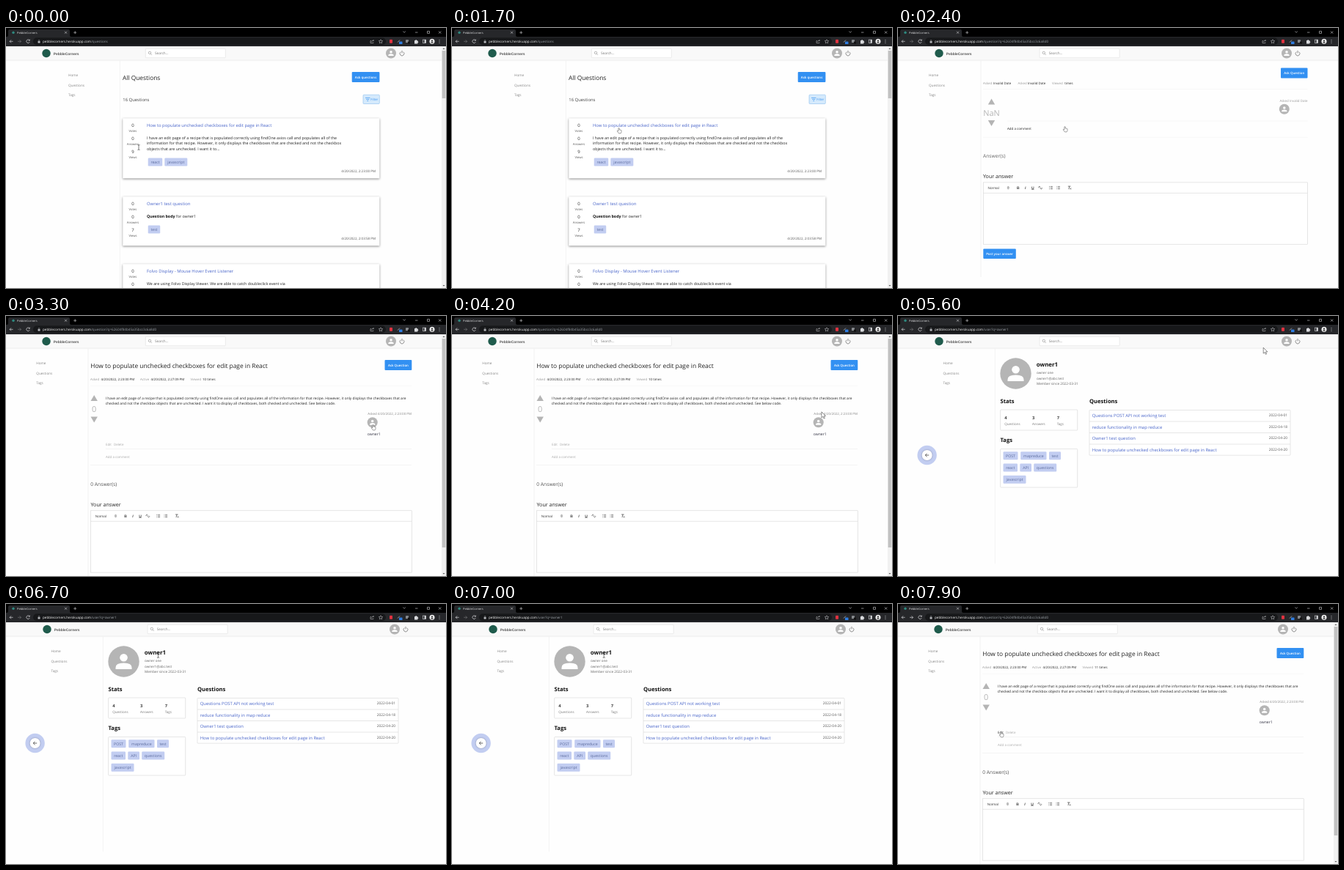
Recreate the animation shown at these times as an HTML page. Size 600x355 px, loop 8000 ms.

```html
<!DOCTYPE html>
<html lang="en">
<head>
<meta charset="utf-8">
<title>PebbleCorners</title>
<style>
html, body { margin: 0; width: 100%; height: 100%; overflow: hidden; background: #fff; }
svg { display: block; width: 600px; height: 355px; }
text { font-family: "Open Sans", "Noto Sans", sans-serif; white-space: pre; text-rendering: geometricPrecision; }
.card { filter: drop-shadow(0 1.5px 1.7px rgba(0, 0, 0, .45)); }
.soft { filter: drop-shadow(0 .4px .8px rgba(0, 0, 0, .3)); }
</style>
</head>
<body>
<svg id="stage" viewBox="0 0 600 355" xmlns="http://www.w3.org/2000/svg"></svg>
<script>
const LOOP = 8000, STEP = 100;
const BLUE = '#3290f2', LINK = '#4a66c9', INK = '#222', GREY = '#858585', PALE = '#b4b4b4', TAG = '#c2cdf1';
const SITE = 'pebblecorners.herokuapp.com';
const HEADLINE = 'How to populate unchecked checkboxes for edit page in React';

// drawing helpers; text y is the visual middle of the line
const text = (x, y, size, str, fill = INK, extra = '') =>
  `<text x="${x}" y="${y + size * .36}" font-size="${size}" fill="${fill}" ${extra}>${str}</text>`;
const END = 'text-anchor="end"', MID = 'text-anchor="middle"', BOLD = 'font-weight="700"', SEMI = 'font-weight="600"';
const SANS = `style="font-family:'Liberation Sans',sans-serif"`;
const rect = (x, y, w, h, fill, extra = '') =>
  `<rect x="${x}" y="${y}" width="${w}" height="${h}" fill="${fill}" ${extra}/>`;
const frame = (x, y, w, h, stroke, r = .8) =>
  rect(x, y, w, h, '#fff', `rx="${r}" stroke="${stroke}" stroke-width=".5"`);
const disc = (x, y, r, fill, extra = '') => `<circle cx="${x}" cy="${y}" r="${r}" fill="${fill}" ${extra}/>`;
const line = (d, stroke, w = .5, extra = '') => `<path d="${d}" fill="none" stroke="${stroke}" stroke-width="${w}" ${extra}/>`;
const hline = (x1, x2, y, c = '#e9e9e9') => line(`M${x1} ${y}H${x2}`, c);
const group = (id, body) => `<g id="${id}">${body}</g>`;

const button = (x, y, w, h, label) =>
  rect(x, y, w, h, BLUE, 'rx="1"') + text(x + w / 2, y + h / 2, 4.4, label, '#fff', `${MID} ${SEMI}`);
const tag = (x, y, w, label) =>
  rect(x, y, w, 11, TAG, 'rx="1.2"') + text(x + w / 2, y + 5.4, 5.2, label, '#5b6b9d', MID);
const person = (x, y, r) => disc(x, y, r, '#b5b5b5') + disc(x, y - r * .25, r * .25, '#fff') +
  `<path d="M${x - r * .52} ${y + r * .5}v${-r * .1}q0 ${-r * .3} ${r * .52} ${-r * .3}t${r * .52} ${r * .3}v${r * .1}z" fill="#fff"/>`;

function chrome() {
  const c = '#d8d9dc';
  return rect(0, 0, 600, 25, '#000') +
    '<path d="M1 12Q3 12 3 10V4Q3 2 5 2H85Q87 2 87 4V10Q87 12 89 12H600V25H0V12z" fill="#26272a"/>' +
    disc(10, 6.2, 1.7, '#2e8a80') + text(15, 6.2, 4, 'PebbleCorners', '#dfe0e2') +
    line('M80 4.7l3 3m0-3l-3 3M92.2 6.2h4m-2-2v4', c, .6) +
    line('M541.5 4.5l1.7 1.7l1.7-1.7M558 6h3.5M574.5 4.3h3v3h-3zM590 4.4l3.2 3.2m0-3.2l-3.2 3.2', c, .6) +
    rect(37, 13.3, 481, 10, '#17181a', 'rx="5"') +
    line('M9.5 18.3H5m2-2l-2 2l2 2', c, .7) +
    group('fwd', line('M16 18.3h4.5m-2-2l2 2l-2 2', c, .7)) +
    line('M32 16.8a2.3 2.3 0 1 0 .3 2.2m0-3.5v1.7h-1.7', c, .7) +
    rect(43.5, 17.9, 3, 2.5, '#b9bbbf', 'rx=".3"') + line('M44.2 18v-.8a.8 .8 0 0 1 1.6 0v.8', '#b9bbbf') +
    text(50, 18.3, 4.6, `${SITE}<tspan id="path" fill="#9aa0a6"></tspan>`, '#f4f4f4') +
    line('M498 17.5h-1v3h4v-1M498.5 19q0-2 3-2m-1-1l1 1l-1 1', c) +
    line('M511 15.7l.8 1.7l1.9.2l-1.4 1.3l.4 1.9l-1.7-1l-1.7 1l.4-1.9l-1.4-1.3l1.9-.2z', c) +
    rect(523, 15.7, 4, 5, '#e0323f', 'rx=".8"') +
    line('M534 19.5l3-3', '#9aa0a6', 1) + rect(536, 18.5, 4.5, 3.5, '#2f7de0', 'rx=".6"') +
    rect(545, 16, 4, 4, '#85888c', 'rx=".6"') + rect(548, 18.6, 3, 3, '#111') +
    `<path d="M557 17h1.3a.9.9 0 0 1 1.8 0h1.3v1.3a.9.9 0 0 1 0 1.8v1.3h-4.4z" fill="${c}"/>` +
    rect(568.5, 16, 4, 4.5, 'none', `stroke="${c}" stroke-width=".6"`) + rect(570.6, 16, 2, 4.5, c) +
    disc(581, 18.3, 3.5, '#f1f1f1') + disc(581, 17.4, 1.2, '#444') + rect(579.3, 18.9, 3.4, 1.7, '#444', 'rx=".8"') +
    [16.3, 18.3, 20.3].map(y => disc(591, y, .5, c)).join('');
}

// wide pages have no scrollbar, which shifts the header
function header(wide) {
  const [a, b, c] = wide ? [1, 2.8, 5] : [0, 0, 0];
  const p = 540 + c;
  return rect(0, 25, 600, 330, '#fefefe') + rect(0, 25, 600, 19, '#f9f9f9') +
    rect(0, 43.7, 600, .6, '#e3e3e3') + rect(0, 44.3, 600, .8, '#f4f4f4') +
    disc(55 + a, 34.5, 5.7, '#1f5b4c') +
    text(64.8 + a, 35.2, 4.9, 'PebbleCorners', '#555', `${BOLD} ${SANS}`) +
    frame(190.3 + b, 28.2, 109, 12.5, '#d9d9d9') +
    disc(196 + b, 33.8, 1.7, 'none', 'stroke="#888" stroke-width=".6"') + line(`M${197.3 + b} 35.1l1.6 1.7`, '#888', .6) +
    text(203 + b, 34.4, 4.7, 'Search...', '#777') +
    person(525 + c, 34.5, 7) +
    line(`M${p - 1.7} 32.6a2.9 2.9 0 1 0 3.4 0M${p} 30.8v3.5`, '#666', .7);
}

const sidebar = (x, edge, bottom) =>
  ['Home', 'Questions', 'Tags'].map((s, i) => text(x, 64.5 + i * 13.6, 4.65, s, GREY)).join('') +
  line(`M${edge} 45V${bottom}`, '#e6e6e6');

const scrollbar = len => rect(594, 25, 6, 330, '#f1f1f1') + rect(594.7, 31, 4.6, len, '#c1c1c1') +
  '<path d="M595.5 29l1.5-1.8l1.5 1.8zM595.5 351l1.5 1.8l1.5-1.8z" fill="#606060"/>';

function card(y, h, views, title, date, dateY, body) {
  const counts = [[0, 'Votes'], [0, 'Answers'], [views, 'Views']].map(([n, s], i) =>
    text(173, y + 10 + i * 18, 6, n, '#333', MID) + text(173, y + 17 + i * 18, 4.2, s, '#555', MID)).join('');
  return rect(159.3, y, 350, h, '#fff', 'class="card" rx=".5"') + counts +
    text(192, y + 10, 5.92, title, LINK) + text(504, dateY, 4.5, date, '#555', END) + body;
}

function listPage() {
  return header(false) + sidebar(85, 155.3, 355) +
    text(159, 68, 8.4, 'All Questions') + button(471.7, 60, 37.7, 14, 'Ask questions') +
    text(159.3, 97.5, 5.9, '16 Questions', '#444') +
    rect(487, 91.2, 22.3, 12.3, '#d5eafc', 'rx="1" stroke="#8cc0ee" stroke-width=".6"') +
    line('M490 95.3h6.5M491.2 97.4h4.1M492.4 99.5h1.7', BLUE, .7) + text(497.3, 97.4, 4.3, 'Filter', BLUE) +
    card(123.3, 82, 9, HEADLINE, '4/20/2022, 2:23:00 PM', 195,
      ['I have an edit page of a recipe that is populated correctly using findOne axios call and populates all of the',
       'information for that recipe. However, it only displays the checkboxes that are checked and not the checkbox',
       'objects that are unchecked. I want it to...'].map((s, i) => text(192, 150 + i * 7.5, 5.3, s)).join('') +
      tag(193.7, 177.5, 19.5, 'react') + tag(216.3, 177.5, 31, 'javascript')) +
    card(230.3, 67, 7, 'Owner1 test question', '4/20/2022, 2:03:58 PM', 287,
      text(192, 257, 5.3, `<tspan ${BOLD} fill="#111">Question body</tspan> for owner1`) + tag(193.7, 269.5, 16.5, 'test')) +
    card(322.3, 60, 5, 'Folvo Display - Mouse Hover Event Listener', '', 380,
      text(192, 349, 5.3, 'We are using Folvo Display Viewer. We are able to catch doubleclick event via')) +
    scrollbar(65);
}

function editor(x, y, w) {
  const c = '#444', mid = y + 7.2;
  const icon = (dx, d, sw = .6) => line(d, c, sw, `transform="translate(${x + dx} ${mid})"`);
  const letter = (dx, s, extra) => text(x + dx, mid, 5, s, c, `${SANS} ${MID} ${extra}`);
  const list = 'M-.7-1.7h3M-.7 0h3M-.7 1.7h3';
  return frame(x, y, w, 84.3, '#ccc', 0) + hline(x, x + w, y + 14.5, '#ccc') +
    text(x + 6.3, mid, 4.7, 'Normal', c, SANS) +
    icon(34, 'M-1.2-.6l1.2-1.5l1.2 1.5zM-1.2.6l1.2 1.5l1.2-1.5z', .4) +
    letter(47.5, 'B', BOLD) + letter(57.5, 'I', `${SEMI} font-style="italic"`) + letter(67.5, 'U', SEMI) +
    icon(67.5, 'M-1.8 2.3h3.6') +
    icon(77.8, 'M-.7-.7l1.4 1.4M-.2-1.2a1.1 1.1 0 1 0-1.5 1.5M.2 1.2a1.1 1.1 0 1 0 1.5-1.5', .7) +
    icon(92.3, list + 'M-2-2.2v1.2M-2.4.2h.8M-2.4 1.9h.8') +
    icon(102.3, list + 'M-2.2-1.7h.7M-2.2 0h.7M-2.2 1.7h.7') +
    icon(117.5, 'M-2-2h3.6M0-2l-1 4M.7.5l1.7 1.7m0-1.7l-1.7 1.7', .7);
}

const meta = (y, items) => items.map(([x, s, dark]) => text(x, y, 4.4, s, dark ? INK : '#999')).join('');
const votes = (x, y, n) =>
  `<path d="M${x - 4.7} ${y - 11}h9.4l-4.7-8zM${x - 4.7} ${y + 10.5}h9.4l-4.7 8z" fill="${PALE}"/>` +
  text(x, y, 10.9, n, PALE, MID);

function pendingPage() {
  return header(true) + sidebar(42, 113, 340) + button(522, 54.5, 36.5, 14, 'Ask Question') +
    meta(75.3, [[116, 'Asked'], [130, 'Invalid Date', 1], [163.5, 'Asked'], [177, 'Invalid Date', 1], [210, 'Viewed'], [227.3, 'times', 1]]) +
    hline(116, 558.5, 83.5, '#f0f0f0') + votes(127.5, 115.6, 'NaN') +
    text(558.5, 99.3, 4.45, 'Asked Invalid Date', '#999', END) + person(526.8, 110.8, 7) +
    hline(149, 558.5, 127, '#efefef') + text(149, 137.5, 4.45, 'Add a comment') + hline(116, 558.5, 149.3, '#efefef') +
    text(116, 175, 6.7, 'Answer(s)', '#666') + text(116, 202.5, 7.1, 'Your answer') +
    editor(116.3, 210.9, 442) + button(116.3, 301.5, 44.5, 13.5, 'Post your answer');
}

function questionPage() {
  return header(false) + sidebar(41.3, 112, 355) + text(115.3, 67.5, 8.4, HEADLINE) +
    button(516.5, 60, 36.8, 14, 'Ask Question') +
    meta(86.7, [[115, 'Asked'], [129.5, '4/20/2022, 2:23:00 PM', 1], [183, 'Active'], [197.5, '4/20/2022, 2:27:09 PM', 1],
      [251.5, 'Viewed'], [268, '<tspan id="views"></tspan> times', 1]]) +
    hline(115, 553, 95.3, '#efefef') + votes(120.2, 127, '0') +
    ['I have an edit page of a recipe that is populated correctly using findOne axios call and populates all of the information for that recipe. However, it only displays the checkboxes that are',
     'checked and not the checkbox objects that are unchecked. I want it to display all checkboxes, both checked and unchecked. See below code.'
    ].map((s, i) => text(135.7, 112.3 + i * 7, 4.84, s)).join('') +
    text(553, 133.7, 4.45, 'Asked 4/20/2022, 2:23:00 PM', '#888', END) + person(499.7, 145.3, 7) + text(492.7, 161.5, 5.15, 'owner1', '#334') +
    text(136, 175, 4.45, 'Edit', '#aaa', 'id="edit"') + text(147, 175, 4.45, 'Delete', '#aaa') + hline(136, 553, 181.5) +
    text(136, 192.3, 4.45, 'Add a comment', '#aaa') + hline(115, 553, 203.5) +
    text(115.3, 230, 6.7, '0 Answer(s)', '#555') + text(115.5, 257.7, 7.1, 'Your answer') +
    editor(115.5, 265.8, 437.7) + scrollbar(285);
}

function userPage() {
  const heading = (x, y, s) => text(x, y, 7.6, s, '#111', BOLD);
  const stats = [[145.3, 4, 'Questions'], [183, 3, 'Answers'], [216.7, 7, 'Tags']].map(([x, n, s]) =>
    text(x, 138.6, 5.7, n, '#111', SEMI) + text(x, 147.3, 4.5, s, '#777')).join('');
  const rows = [['Questions POST API not working test', '01'], ['reduce functionality in map reduce', '18'],
    ['Owner1 test question', '20'], [HEADLINE, '20']].map(([s, d], i) => {
      const y = 136.3 + i * 15.5;
      return text(264.7, y, 5.9, s, LINK) + text(531, y - .6, 4.85, '2022-04-' + d, '#555', END) +
        (i ? hline(261, 535, y - 7.8, '#ccc') : '');
    }).join('');
  return header(true) + sidebar(61.5, 132.3, 338) + person(160.5, 78.5, 21.2) +
    heading(139.5, 116, 'Stats') + heading(139.5, 169.7, 'Tags') + heading(261, 116, 'Questions') +
    disc(39.6, 190, 13.2, TAG) + disc(39.6, 190, 7, '#fff', 'class="soft"') + line('M42.2 190h-5m2.3-2.3l-2.3 2.3l2.3 2.3', '#444', .8) +
    group('profile',
      text(188.7, 66, 7.9, 'owner1', '#111', BOLD) + text(189, 77.7, 4.6, 'owner one', '#666') +
      text(189, 85.3, 4.6, 'owner1@abc.test', '#666') + text(189, 92.8, 4.7, 'Member since 2022-03-31', '#666') +
      frame(139.7, 128, 105, 28, '#ccc') + stats +
      frame(139.7, 181.5, 105, 52.5, '#ccc') +
      tag(143.5, 185.3, 20, 'POST') + tag(167.2, 185.3, 35.3, 'mapreduce') + tag(206, 185.3, 16, 'test') +
      tag(143.5, 201.5, 19.5, 'react') + tag(166.3, 201.5, 15.7, 'API') + tag(185.2, 201.5, 31, 'questions') +
      tag(143.5, 217.7, 31, 'javascript') +
      frame(261, 128.5, 274, 61.7, '#ccc') + rows);
}

const cursors = {
  arrow: '<path d="M-2-4.5v8l1.9-1.7l1.3 2.9l1.3-.6l-1.3-2.8h2.5z" fill="#fff" stroke="#222" stroke-width=".5"/>',
  beam: line('M-1.5-3.5q1.5 0 1.5.9v5.2q0 .9-1.5.9M1.5-3.5q-1.5 0-1.5.9M0 2.6q0 .9 1.5.9', '#222', .6),
  hand: '<path d="M-1.1.7v-3.8q.7-.9 1.3 0v2.1q1.9-.2 2.8.9v1.8q0 1.1-.9 2.2h-2.7l-2.3-3.2q.4-.9 1.8 0z" fill="#fff" stroke="#444" stroke-width=".5" stroke-linejoin="round"/>'
};

// time, x, y, pointer from that time on
const track = [
  [0, 181, 163, 'beam'], [1000, 181, 163, 'beam'], [1400, 206, 152, 'beam'], [1700, 228, 140, 'hand'],
  [2300, 228, 138, 'hand'], [2500, 228, 138, 'arrow'], [2900, 365, 150, 'arrow'], [3300, 501, 152, 'hand'],
  [3900, 502, 153, 'hand'], [4000, 502, 153, 'arrow'], [4800, 527, 40, 'hand'], [5000, 528, 37, 'hand'],
  [5500, 528, 37, 'arrow'], [5900, 350, 105, 'arrow'], [6200, 218, 170, 'arrow'], [6400, 205, 120, 'arrow'],
  [6600, 207.5, 70, 'beam'], [7300, 207, 70, 'arrow'], [7700, 143, 181, 'hand'], [7900, 141, 178, 'hand'], [LOOP, 141, 178, 'hand']
];
const ID = '/question?q=62604f84b45a35bcc3c6a8d0', USER = '/user?q=owner1';
const visits = [
  [0, 'list', '/questions'], [2400, 'pending', ID], [2600, 'question', ID],
  [5300, 'user', USER], [7100, 'pending', ID], [7300, 'question', ID]
];

const stage = document.getElementById('stage');
const pages = { list: listPage, pending: pendingPage, question: questionPage, user: userPage };
stage.innerHTML = Object.entries(pages).map(([id, draw]) => group(id, draw())).join('') + chrome() +
  group('pointer', Object.entries(cursors).map(([id, d]) => group(id, d)).join(''));

const $ = id => document.getElementById(id);
const show = (id, on) => { $(id).style.display = on ? '' : 'none'; };

function render(t) {
  const [, page, path] = visits.filter(v => v[0] <= t).pop();
  for (const id in pages) show(id, id === page);
  $('path').textContent = path;
  $('views').textContent = t < 7000 ? 10 : 11;
  $('edit').setAttribute('fill', t >= 7700 ? INK : '#aaa');
  $('fwd').style.opacity = t >= 7100 ? 1 : .4;
  show('profile', t >= 5400);

  const i = track.findIndex((k, n) => t < track[n + 1][0]);
  const [t0, x0, y0, kind] = track[i], [t1, x1, y1] = track[i + 1];
  const u = (t - t0) / (t1 - t0), e = u * u * (3 - 2 * u);
  $('pointer').setAttribute('transform', `translate(${x0 + (x1 - x0) * e} ${y0 + (y1 - y0) * e})`);
  for (const id in cursors) show(id, id === kind);
}

const start = performance.now();
function tick() {
  const t = (performance.now() - start) % LOOP;
  render(Math.floor(t / STEP) * STEP);
  requestAnimationFrame(tick);
}
tick();
</script>
</body>
</html>
```
